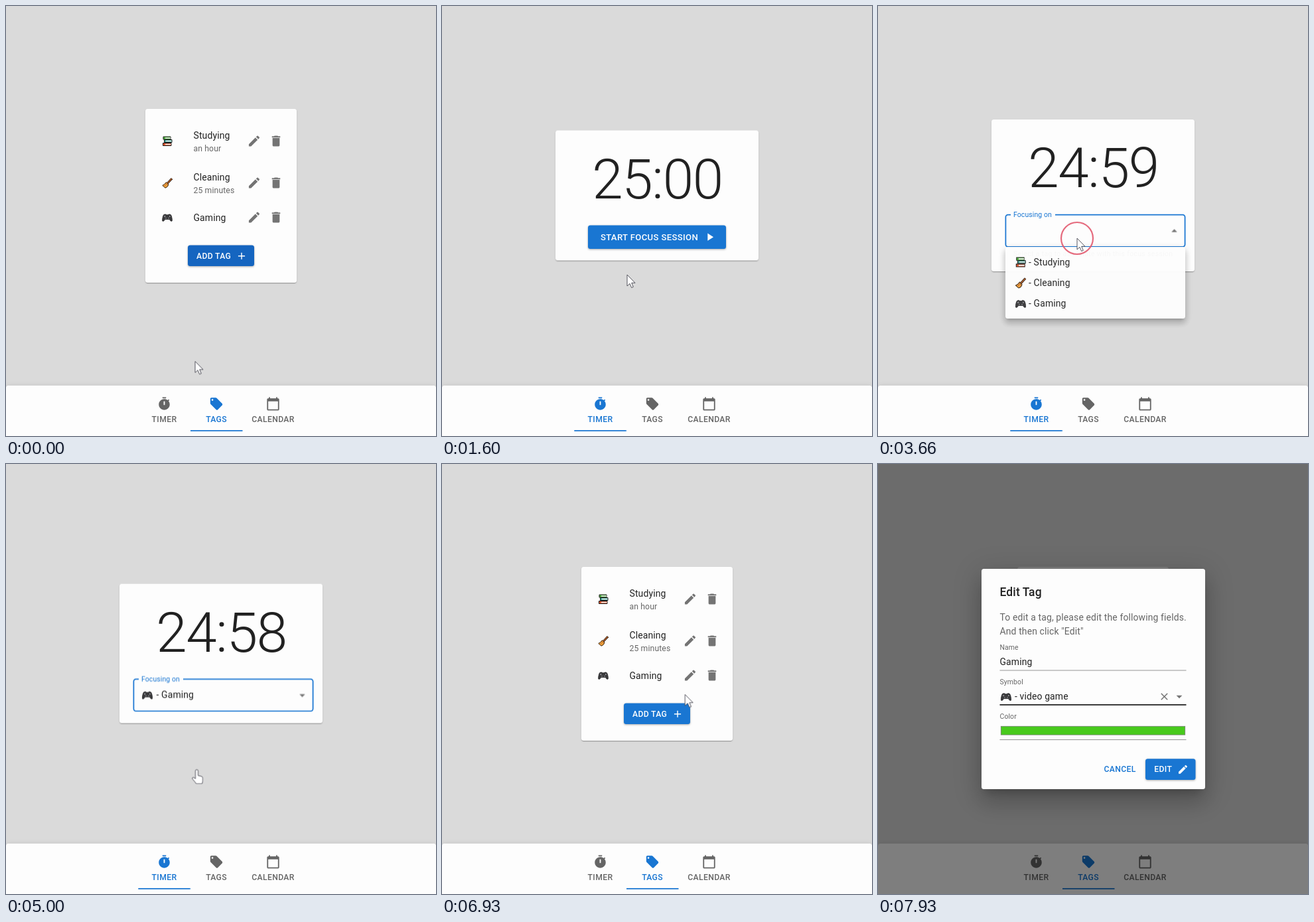
An HTML page for the animation above (8 s loop, 648 px wide and 648 px high).

```html
<!DOCTYPE html>
<html lang="en">
<head>
<meta charset="utf-8">
<title>Focus timer</title>
<style>
  html, body { margin: 0; width: 100%; height: 100%; overflow: hidden; background: #dadada; }
  #stage { position: relative; width: 648px; height: 648px; overflow: hidden; background: #dadada; }
  .layer, .paper, svg.art { position: absolute; left: 0; top: 0; }
  .layer, svg.art { width: 648px; height: 648px; }
  .paper { background: #fdfdfd; border-radius: 3.5px; }
  .low { box-shadow: 0 1.7px 1px -1px rgba(0,0,0,.2), 0 1px 1px rgba(0,0,0,.14), 0 1px 2.6px rgba(0,0,0,.12); }
  .mid { box-shadow: 0 2px 4px -1px rgba(0,0,0,.2), 0 4px 5px rgba(0,0,0,.14), 0 1px 9px rgba(0,0,0,.12); }
  .menu { box-shadow: 0 4px 4px -3px rgba(0,0,0,.2), 0 7px 9px 1px rgba(0,0,0,.14), 0 3px 12px 2px rgba(0,0,0,.12); }
  .high { box-shadow: 0 10px 13px -6px rgba(0,0,0,.2), 0 21px 33px 3px rgba(0,0,0,.14), 0 8px 40px 7px rgba(0,0,0,.12); }
  .raised { filter: drop-shadow(0 1.5px 1.5px rgba(0,0,0,.32)); }
  text { font-family: Roboto, sans-serif; fill: currentColor; white-space: pre; }
  use { fill: currentColor; }
  .body { font-size: 13.95px; letter-spacing: .00938em; }
  .small { font-size: 12.2px; letter-spacing: .01071em; }
  .label { font-size: 10.46px; letter-spacing: .00938em; }
  .hint { font-size: 10.46px; letter-spacing: .0333em; }
  .button { font-size: 12.2px; font-weight: 500; letter-spacing: .02857em; }
  .large { font-size: 13.08px; }
  .title { font-size: 17.44px; font-weight: 500; letter-spacing: .0075em; }
  .clock { font-size: 83.7px; font-weight: 300; letter-spacing: -.01562em; text-anchor: middle; }
  .mid-text { text-anchor: middle; }
  .ink { color: rgba(0,0,0,.87); }
  .soft { color: rgba(0,0,0,.6); }
  .icon { color: rgba(0,0,0,.54); }
  .blue { color: #1976d2; }
  .white { color: #fff; }
</style>
</head>
<body>
<svg width="0" height="0" style="position:absolute">
  <symbol id="edit" viewBox="0 0 24 24"><path d="M3 17.25V21h3.75L17.81 9.94l-3.75-3.75L3 17.25zM20.71 7.04c.39-.39.39-1.02 0-1.41l-2.34-2.34a1 1 0 0 0-1.41 0l-1.83 1.83 3.75 3.75 1.83-1.83z"/></symbol>
  <symbol id="bin" viewBox="0 0 24 24"><path d="M6 19c0 1.1.9 2 2 2h8c1.1 0 2-.9 2-2V7H6v12zM19 4h-3.5l-1-1h-5l-1 1H5v2h14V4z"/></symbol>
  <symbol id="watch" viewBox="0 0 24 24"><path d="M9 1h6v2H9zM19.03 7.39l1.42-1.42c-.43-.51-.9-.99-1.41-1.41l-1.42 1.42C16.07 4.74 14.12 4 12 4c-4.97 0-9 4.03-9 9s4.02 9 9 9 9-4.03 9-9c0-2.12-.74-4.07-1.97-5.61zM13 14h-2V8h2v6z"/></symbol>
  <symbol id="tag" viewBox="0 0 24 24"><path d="M21.41 11.58l-9-9C12.05 2.22 11.55 2 11 2H4c-1.1 0-2 .9-2 2v7c0 .55.22 1.05.59 1.42l9 9c.36.36.86.58 1.41.58s1.05-.22 1.41-.59l7-7c.37-.36.59-.86.59-1.41s-.23-1.06-.59-1.42zM5.5 7a1.5 1.5 0 1 1 0-3 1.5 1.5 0 0 1 0 3z"/></symbol>
  <symbol id="calendar" viewBox="0 0 24 24"><path d="M20 3h-1V1h-2v2H7V1H5v2H4c-1.1 0-2 .9-2 2v16c0 1.1.9 2 2 2h16c1.1 0 2-.9 2-2V5c0-1.1-.9-2-2-2zm0 18H4V8h16v13z"/></symbol>
  <symbol id="play" viewBox="0 0 24 24"><path d="M8 5v14l11-7z"/></symbol>
  <symbol id="plus" viewBox="0 0 24 24"><path d="M19 13h-6v6h-2v-6H5v-2h6V5h2v6h6v2z"/></symbol>
  <symbol id="cross" viewBox="0 0 24 24"><path d="M19 6.41L17.59 5 12 10.59 6.41 5 5 6.41 10.59 12 5 17.59 6.41 19 12 13.41 17.59 19 19 17.59 13.41 12z"/></symbol>
  <symbol id="drop" viewBox="0 0 24 24"><path d="M7 10l5 5 5-5z"/></symbol>
  <symbol id="books" viewBox="0 0 16 16">
    <g stroke="#1c1c1c">
      <path fill="#4fb83d" d="M2 1h11v4H2z"/><path fill="#3aa596" d="M3.5 5.5H15v4H3.5z"/><path fill="#e0542c" d="M1.5 10.5H14v4H1.5z"/>
    </g>
    <path fill="#f4f4f4" d="M5 2.2h8v1.6H5zM6 6.7h8.5v1.6H6zM5 11.7h8.5v1.6H5z"/>
  </symbol>
  <symbol id="broom" viewBox="0 0 16 16">
    <path stroke="#2a1a10" stroke-width="3" d="M15 1L8 8.500"/><path stroke="#b8632e" stroke-width="1.400" d="M14.700 1.300L8 8.500"/>
    <path fill="#f2a33a" stroke="#3a2412" d="M6.500 6.500l3.500 3.500q-1 4-5 5.200L.8 11.400q3-1 5.700-4.900z"/>
    <path stroke="#a8552a" d="M5.500 8l3 3M4 12l1.500-1.500"/>
  </symbol>
  <symbol id="pad" viewBox="0 0 16 16">
    <path fill="#3a3a3c" stroke="#1d1d1f" stroke-width=".7" d="M4 3h2l.7.8h2.600L10 3h2q1.800 0 2.500 3 1.400 5.500.7 7-1.500 1.500-4-2.500H4.800q-2.500 4-4 2.500-.7-1.500.7-7Q2.200 3 4 3z"/>
    <circle cx="4.300" cy="6" r="1.200" fill="#88888c"/><circle cx="10" cy="8.800" r="1" fill="#77777b"/><circle cx="6" cy="8.800" r="1" fill="#77777b"/>
    <path fill="#9a9a9e" d="M11 5h1.500v2H11z"/>
  </symbol>
</svg>
<div id="stage"></div>

<script>
const LOOP = 8000;
const GREY = 'rgba(0,0,0,.6)', BLUE = '#1976d2', NAVY = '#1565c0';
const START = 2330, FOCUS = 3450, PICK = 4700, BLUR = 6040;

const icon = (id, x, y, size, cls = 'icon', name = '') =>
  `<use id="${name}" class="${cls}" href="#${id}" x="${x - size / 2}" y="${y - size / 2}" width="${size}" height="${size}"/>`;
const text = (str, x, y, cls, name = '') => `<text id="${name}" class="${cls}" x="${x}" y="${y}">${str}</text>`;
const rect = (x, y, w, h, attrs) => `<rect x="${x}" y="${y}" width="${w}" height="${h}" ${attrs}/>`;
const paper = (x, y, w, h, cls, name = '') =>
  `<div id="${name}" class="paper ${cls}" style="left:${x}px;top:${y}px;width:${w}px;height:${h}px"></div>`;
const art = body => `<svg class="art">${body}</svg>`;
const layer = (name, body) => `<div id="${name}" class="layer">${body}</div>`;
const ripple = (name, x, y, fill) => `<circle id="${name}" cx="${x}" cy="${y}" r="0" fill="${fill}"/>`;

const tagRow = (emoji, name, y, time, timeY) =>
  icon(emoji, 243, y, 16, '') + text(name, 282.5, timeY ? timeY - 18.5 : y + 4.5, 'body ink') +
  (time ? text(time, 282.5, timeY, 'small soft') : '') +
  icon('edit', 374, y - .5, 21.5) + icon('bin', 407, y - .5, 21.5);

const tagsPage = layer('tags', paper(210, 155, 228, 261.5, 'low') + art(
  tagRow('books', 'Studying', 204, 'an hour', 218.5) +
  tagRow('broom', 'Cleaning', 267, '25 minutes', 281.5) +
  tagRow('pad', 'Gaming', 319) +
  `<g class="raised">${rect(274, 360.5, 100, 31.5, `id="add" rx="3.5" fill="${BLUE}"`)}</g>` +
  text('ADD TAG', 287, 380.7, 'button white') + icon('plus', 355, 376.7, 17.4, 'white') +
  ripple('editRipple', 374, 319, '#000')));

// Coordinates here are relative to the top of the card.
const timerPage = layer('timer', `<div id="session" class="layer">` +
  paper(171, 0, 306, 196, 'low', 'sheet') + art(
    ['25:00', '24:59', '24:58', '24:57'].map((s, i) => text(s, 324.5, 102, 'clock ink', 'clock' + i)).join('') +
    `<g id="start"><g class="raised">${rect(220, 143, 208, 35.5, `id="startFace" rx="3.5" fill="${BLUE}"`)}</g>
      <svg x="220" y="143" width="208" height="35.5">${ripple('startRipple', 80, 19, '#fff')}</svg>
      ${text('START FOCUS SESSION', 239, 165.2, 'button large white')}${icon('play', 403.5, 160.7, 19.2, 'white')}</g>` +
    `<g id="field">
      ${rect(192.2, 143.5, 270.6, 48.500, 'id="idle" rx="3.5" fill="none" stroke="#000"')}
      ${rect(192.4, 143.6, 270.2, 48.200, `id="active" rx="3.5" fill="none" stroke="${BLUE}" stroke-width="1.75"`)}
      ${rect(200, 141, 67, 6, 'id="notch" fill="#fdfdfd"')}
      ${text('Focusing on', 0, 0, 'label', 'fieldLabel')}
      <g id="value">${icon('pad', 213, 168, 16.5, '')}${text('- Gaming', 226.5, 172.3, 'body ink')}</g>
      ${icon('drop', 446.5, 168, 21, 'icon', 'arrow')}
      ${text('Select a tag to associate with this focus session', 204, 206, 'hint soft', 'helper')}</g>`) + '</div>');

const tab = (name, sym, str, x) =>
  `<g id="${name}">${icon(sym, x, 599.5, 22, '')}${text(str, x, 627.2, 'button mid-text')}</g>`;
const nav = layer('nav', paper(0, 571.5, 648, 80, 'mid') + art(
  `<svg x="199" y="571" width="79" height="77">${ripple('timerRipple', 27, 34, BLUE)}</svg>
   <svg x="278" y="571" width="78" height="77">${ripple('tagsRipple', 35, 35, BLUE)}</svg>` +
  tab('timerTab', 'watch', 'TIMER', 238.5) + tab('tagsTab', 'tag', 'TAGS', 317) +
  `<g class="soft">${tab('calendarTab', 'calendar', 'CALENDAR', 402.5)}</g>` +
  rect(0, 639.2, 78.5, 1.75, `id="marker" fill="${BLUE}"`)));

const option = (emoji, name, i) => rect(192, 370 + i * 31.4, 271, 31.4, `id="option${i}" fill="#000"`) +
  icon(emoji, 215, 386.3 + i * 31.3, 16.5, '') + text('- ' + name, 227, 390.7 + i * 31.3, 'body ink');
const menu = layer('menu', paper(192, 363, 271, 107.5, 'menu') + art(
  option('books', 'Studying', 0) + option('broom', 'Cleaning', 1) + option('pad', 'Gaming', 2)));

const line = (y, h, alpha, name) => rect(183.5, y, 281, h, `id="${name}" fill="rgba(0,0,0,${alpha})"`);
const dialog = layer('dialog', paper(155.5, 158, 337, 332, 'high') + art(
  text('Edit Tag', 183.5, 199.3, 'title ink') +
  text('To edit a tag, please edit the following fields.', 183.5, 236.2, 'body soft') +
  text('And then click "Edit"', 183.5, 257, 'body soft') +
  text('Name', 183.5, 279.5, 'label soft') + text('Gaming', 183.5, 302.5, 'body ink') + line(310.5, 1, .42, '') +
  text('Symbol', 0, 0, 'label soft', 'symbolLabel') + icon('pad', 193, 351, 16.5, '') +
  text('- video game', 206, 355.3, 'body ink') + icon('cross', 431.5, 350.5, 18) + icon('drop', 454, 350.5, 21) +
  line(363, 1, .42, 'thin') + line(362, 1.75, .87, 'thick') +
  text('Color', 183.5, 384, 'label soft') +
  rect(185.3, 395.3, 277.4, 12.8, 'fill="#48ca1c" stroke="#6f7a6c" stroke-width=".8"') + line(415, 1, .42, '') +
  text('CANCEL', 340.5, 464.3, 'button blue') +
  `<g class="raised">${rect(403, 444.2, 75.5, 31.8, `rx="3.5" fill="${BLUE}"`)}</g>` +
  text('EDIT', 416.3, 464.3, 'button white') + icon('edit', 459.5, 460.2, 17.4, 'white')));

const pointer = art(`<g id="pointer">
  <circle id="ring" r="0" fill="none" stroke="#e2566b" stroke-width="2.2" opacity=".88"/>
  <g fill="#fff" stroke="#45454f" stroke-width=".9" stroke-linejoin="round">
    <path id="arrowTip" d="M0 0V17L4 13.300 6.700 19.500 9.300 18.300 6.700 12.300H12z"/>
    <path id="hand" d="M-2 2a2 2 0 0 1 4 0v7l5 1.200q2 .6 2 2.600v4q0 2-1 4.500h-9q-1.500-3-5-6.500-1.800-2 0-3 1.500-.5 4 2z"/>
  </g></g>`);

document.getElementById('stage').innerHTML = tagsPage + timerPage + nav + menu +
  '<div id="shade" class="layer" style="background:rgba(0,0,0,.5)"></div>' + dialog + pointer;

// Each step is [start ms, duration ms, new value]; a zero duration is a hard change.
function tween(name, prop, first, steps, easing = 'cubic-bezier(.4,0,.2,1)') {
  const frames = [];
  let value = first;
  const key = ms => frames.push({ offset: ms / LOOP, [prop]: value, easing });
  key(0);
  for (const [start, span, next] of steps) {
    key(start);
    value = next;
    key(start + span);
  }
  key(LOOP);
  document.getElementById(name).animate(frames, { duration: LOOP, iterations: Infinity });
}
const show = (name, spans, on = 1, off = 0) =>
  tween(name, 'opacity', off, spans.flatMap(([a, b]) => [[a, 0, on], [b, 0, off]]));
const at = (x, y, scale = 1) => `translate(${x}px, ${y}px) scale(${scale})`;
function splash(name, down, up, radius, alpha) {
  tween(name, 'r', '0px', [[down, 550, radius + 'px'], [down + 1000 > LOOP ? 7950 : down + 1000, 0, '0px']]);
  tween(name, 'opacity', 0, [[down, 0, alpha], [up, 400, 0]]);
}

// Pages and tabs
tween('tags', 'opacity', 1, [[850, 300, 0], [6180, 300, 1]]);
tween('timer', 'opacity', 0, [[850, 300, 1], [6180, 300, 0]]);
tween('timerTab', 'color', GREY, [[850, 0, BLUE], [6170, 0, GREY]]);
tween('tagsTab', 'color', BLUE, [[850, 0, GREY], [6170, 0, BLUE]]);
tween('marker', 'transform', at(278, 0), [[860, 300, at(199.3, 0)], [6210, 300, at(278, 0)]]);
tween('add', 'fill', NAVY, [[20, 250, BLUE]]);

// Focus session
tween('session', 'transform', at(0, 187.5), [[START, 260, at(0, 171)], [4780, 300, at(0, 181)]]);
tween('sheet', 'height', '196px', [[START, 260, '229px'], [4780, 300, '209px']]);
[[0, 3430], [3430, 4430], [4430, 5430], [5430, LOOP]].forEach((span, i) => show('clock' + i, [span]));
tween('start', 'opacity', 1, [[START, 200, 0]]);
tween('startFace', 'fill', BLUE, [[1950, 250, NAVY]]);
tween('field', 'opacity', 0, [[START, 260, 1]]);
tween('idle', 'opacity', .23, [[START, 0, .87], [FOCUS, 0, 0], [BLUR, 0, .23]]);
show('active', [[FOCUS, BLUR]]);
show('notch', [[FOCUS + 40, LOOP]]);
tween('fieldLabel', 'transform', at(204.5, 172.3, 1.333), [[FOCUS, 200, at(204, 147.2)]]);
tween('fieldLabel', 'color', GREY, [[FOCUS, 0, BLUE], [BLUR, 0, GREY]]);
document.getElementById('arrow').style.transformOrigin = '446.5px 168px';
tween('arrow', 'transform', 'rotate(0deg)', [[FOCUS + 30, 0, 'rotate(180deg)'], [PICK, 0, 'rotate(0deg)']]);
show('value', [[PICK, LOOP]]);
tween('helper', 'opacity', 1, [[4720, 200, 0]]);

// Menu
document.getElementById('menu').style.transformOrigin = '327px 363px';
tween('menu', 'opacity', 0, [[3480, 240, 1], [PICK, 200, 0]]);
tween('menu', 'transform', 'scale(.75,.5625)', [[3480, 160, 'scale(1,1)']]);
[[3800, 3920], [3920, 4060], [4060, 4900]].forEach((span, i) => show('option' + i, [span], .04));

// Dialog
tween('shade', 'opacity', 0, [[7395, 225, 1]]);
tween('dialog', 'opacity', 0, [[7395, 225, 1]]);
tween('symbolLabel', 'transform', at(183.5, 344, 1.19), [[7395, 200, at(183.5, 332)]]);
show('thin', [[0, 7860]]);
show('thick', [[7860, LOOP]]);

// Pointer
tween('pointer', 'transform', at(285, 535.5), [
  [280, 440, at(226, 605)], [1050, 550, at(279, 405)], [1750, 350, at(300, 350)],
  [3750, 480, at(290, 451)], [4850, 150, at(287.500, 460.5)], [5150, 800, at(314, 608)], [6500, 680, at(372, 318.5)]
]);
tween('pointer', 'opacity', 1, [[7560, 0, 0]]);
const overLinks = [[600, 1150], [1900, 2480], [3800, 5060], [5800, 6620], [7080, LOOP]];
show('hand', overLinks);
show('arrowTip', overLinks, 0, 1);
const presses = [[740, 860], [2230, START], [FOCUS, 3700], [4600, PICK], [BLUR, 6210], [7270, 7395]];
tween('ring', 'r', '0px', presses.flatMap(([down, up]) => [[down, 90, '24px'], [up, 160, '0px']]));
splash('timerRipple', 740, 860, 50, .2);
splash('startRipple', 2230, START, 120, .3);
splash('tagsRipple', BLUR, 6210, 50, .2);
splash('editRipple', 7270, 7395, 17, .14);
</script>
</body>
</html>
```
